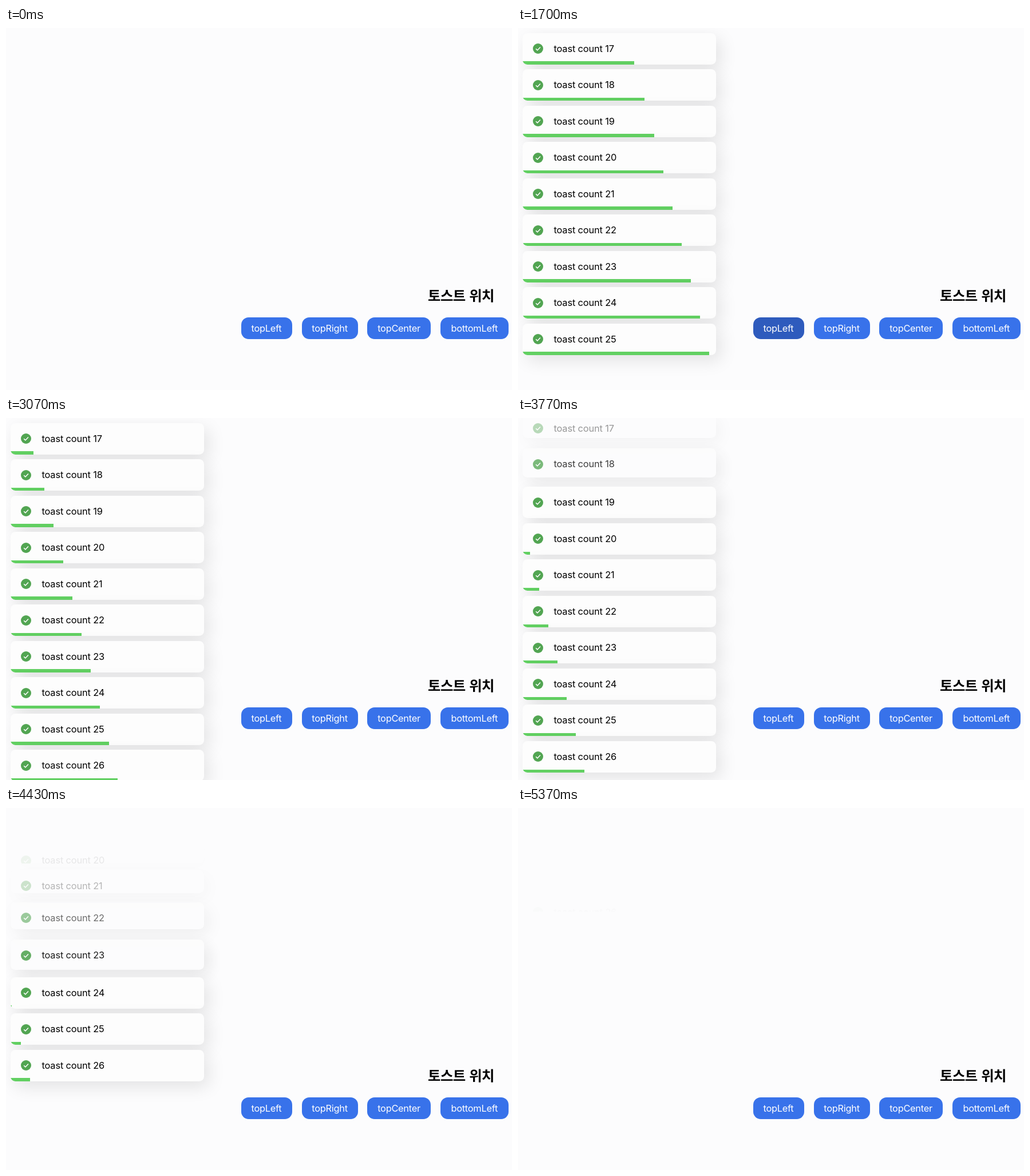
Recreate the animation shown at these times as an HTML page. Size 884x633 px, loop 5.41 s.

```html
<!DOCTYPE html>
<html lang="ko">
<head>
<meta charset="utf-8">
<style>
  html, body { margin: 0; width: 100%; height: 100%; overflow: hidden; background: #fcfcfd; }
  body { position: relative; font: 16.4px Inter, sans-serif; letter-spacing: -.28px; color: #000; }
  h2, button, .toast, .toast * { position: absolute; box-sizing: border-box; }
  h2 {
    left: 695px; top: 448.5px; width: 200px; margin: 0; text-align: center;
    font: 700 24.4px/36px "Noto Sans CJK KR", "Noto Sans CJK", sans-serif; letter-spacing: -.5px;
  }
  button {
    top: 506px; height: 37.7px; padding: 0; border: 0; border-radius: 13px;
    background: #3872ea; color: #fff; font: inherit; letter-spacing: inherit;
  }
  .toast {
    left: 7.5px; width: 338.5px; border-radius: 8.5px; overflow: hidden;
    background: #fdfdfd; box-shadow: 8px 10px 30px rgba(0, 0, 0, .1);
  }
  .toast svg { left: 18.5px; top: 18.5px; }
  .toast span { left: 55px; top: 0; line-height: 55px; white-space: nowrap; letter-spacing: -.16px; }
  .toast i { left: 0; bottom: 0; height: 5.3px; background: #62d062; }
</style>
</head>
<body>
<h2>토스트 위치</h2>
<script>
const LOOP = 5410, LIFE = 3000, UNMOUNT = 1700;
const HEIGHT = 55, GAP = 8.5, WIDTH = 338.5;
const HOVER = [130, 2100];
const starts = [431, 597, 740, 888, 1030, 1172, 1314, 1456, 1598, 1733];

function add(tag, html, style) {
  const el = document.createElement(tag);
  el.innerHTML = html;
  Object.assign(el.style, style);
  return document.body.appendChild(el);
}

const buttons = [
  ['topLeft', 410.5, 89], ['topRight', 516.5, 98], ['topCenter', 631, 111], ['bottomLeft', 759, 118.5],
].map(([label, x, w]) => add('button', label, { left: x + 'px', width: w + 'px' }));

const toasts = starts.map((start, i) => {
  const el = add('div', `<svg width="18" height="18">
    <circle cx="9" cy="9" r="9" fill="#52a552"/>
    <path d="M5.2 9.2 7.9 11.9 13 6.5" fill="none" stroke="#fff" stroke-width="1.5"/>
    </svg><span>toast count ${17 + i}</span><i></i>`, {});
  el.className = 'toast';
  return { el, start, bar: el.querySelector('i') };
});

const clamp = v => Math.min(1, Math.max(0, v));

function draw() {
  const t = performance.now() % LOOP;
  buttons[0].style.background = t >= HOVER[0] && t < HOVER[1] ? '#2e5bbd' : '#3872ea';

  let y = GAP;
  for (const { el, start, bar } of toasts) {
    const age = t - start - LIFE;
    const mounted = t >= start && age < UNMOUNT;
    const shrink = clamp((age - 40) / 760);
    const out = clamp((age - 60) / 640);
    el.style.display = mounted && out < 1 ? 'block' : 'none';
    if (!mounted) continue;

    // A leaving toast shrinks, slides up by its own height and fades.
    const h = HEIGHT - 39.5 * shrink ** 1.35;
    el.style.top = y - h * out ** 1.1 + 'px';
    el.style.height = h + 'px';
    el.style.opacity = 1 - Math.sin(out * Math.PI / 2) ** 1.1;
    bar.style.width = WIDTH * clamp(-age / LIFE) + 'px';
    y += h + GAP;
  }
  requestAnimationFrame(draw);
}
draw();
</script>
</body>
</html>
```
